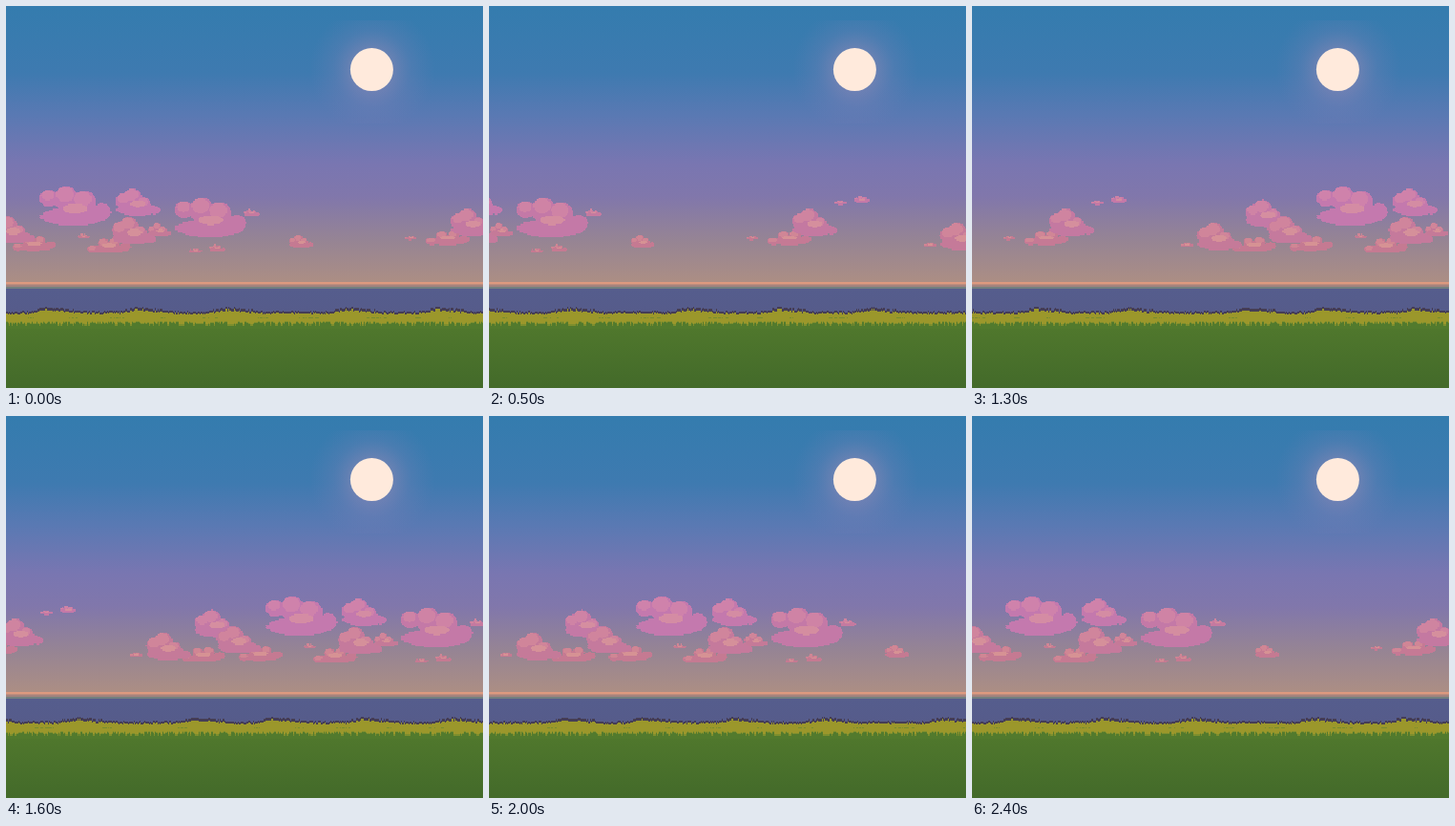
Write an HTML page with a canvas that moves like this. It is 500 by 400 pixels and loops after 2500 ms.

```html
<!DOCTYPE html>
<html lang="en">
<head>
<meta charset="utf-8">
<title>Evening meadow</title>
<style>
  html, body { margin: 0; width: 100%; height: 100%; overflow: hidden; background: #46702d; }
  canvas { display: block; width: 100vw; height: 100vh; image-rendering: pixelated; }
</style>
</head>
<body>
<canvas id="stage" width="500" height="400"></canvas>
<script>
const W = 500, H = 400;
const COLS = 576, ROWS = 324;      // art grid of the scrolling strip
const S = H / ROWS;                // stage pixels per art pixel
const LEFT = -1.83;                // stage x of column 0
const STEP = 24, FRAME = 100, FRAMES = 25;

const rgb = c => `rgb(${c.map(Math.round)})`;
const mix = (a, b, t) => a.map((v, i) => v + (b[i] - v) * t);

let seed = 7;
function random() {
  seed = (seed * 16807) % 2147483647;
  return seed / 2147483647;
}

function makeLayer(w, h) {
  const c = document.createElement('canvas');
  c.width = w;
  c.height = h;
  return c.getContext('2d');
}

// Hard-edged ellipse in stage units on the art grid, wrapping at the sides
function blob(g, x, y, rx, ry, color, bottom, rough = 0) {
  const cx = (x - LEFT) / S, cy = y / S, a = rx / S, b = ry / S;
  const end = Math.min(cy + b, bottom / S);
  g.fillStyle = color;
  for (let row = Math.floor(cy - b); row < end; row++) {
    const k = 1 - ((row + 0.5 - cy) / b) ** 2;
    if (k <= 0) continue;
    const half = a * Math.sqrt(k);
    const x0 = Math.round(cx - half - rough * random());
    const x1 = Math.round(cx + half + rough * random());
    for (const turn of [-COLS, 0, COLS]) g.fillRect(x0 + turn, row, x1 - x0, 1);
  }
}

// Sizes of cloud: peak is where the crown sits, left is how fast it falls there
const KINDS = [
  { w: 13, h: 5, peak: 0.5, left: 1, at: [[75, 238], [192, 253], [418, 240], [510, 203], [604, 247]] },
  { w: 17, h: 8, peak: 0.45, left: 1, at: [[249, 212], [213, 249], [531, 198]] },
  { w: 25, h: 14, peak: 0.4, left: 1, at: [[149, 227], [297, 239]] },
  { w: 46, h: 18, peak: 0.5, left: 1.6, at: [[85, 240], [440, 232], [658, 239], [718, 238]] },
  { w: 47, h: 30, peak: 0.32, left: 1.2,
    at: [[115, 189], [111, 219], [466, 210], [621, 225], [672, 201], [695, 218]] },
  { w: 75, h: 42, peak: 0.5, left: 0.35, at: [[35, 187], [177, 199]] }
];

// Body, light and highlight for the highest and the lowest clouds
const HIGH = [[196, 121, 174], [207, 130, 171], [212, 140, 164]];
const LOW = [[197, 122, 146], [208, 134, 148], [214, 146, 148]];

function drawCloud(g, { w, h, peak, left }, x, y) {
  const t = Math.min(1, (y - 187) / 50);
  const [body, light, high] = HIGH.map((c, i) => rgb(mix(c, LOW[i], t)));
  const bottom = y + h;
  const puffs = [0.125, 0.375, 0.625, 0.875].map(u => {
    const d = Math.abs(u - peak), r = h * (0.36 - 0.4 * d);
    const rx = Math.max(r, w * 0.13);
    const drop = d * (u < peak ? left : 1.25);
    return { x: x + Math.min(Math.max(u * w, rx), w - rx), y: y + r + drop * h, rx, r };
  });
  for (const p of puffs) blob(g, p.x, p.y, p.rx, p.r, body, bottom);
  blob(g, x + w * 0.48, y + h * 0.8, w * 0.44, h * 0.22, body, bottom, w / 25);
  for (const p of puffs.slice(0, 3))
    blob(g, p.x - p.rx * 0.1, p.y - p.r * 0.35, p.rx * 0.7, p.r * 0.6, light, bottom);
  blob(g, x + w * 0.5, y + h * 0.6, w * 0.17, h * 0.12, high, bottom);
}

function drawGrass(g) {
  const mounds = Array.from({ length: 7 }, (_, k) =>
    (42 + 95 * k + 30 * Math.floor(k / 3) - LEFT) / S);
  const dot = (x, y, h, color) => {
    g.fillStyle = color;
    g.fillRect(x, y, 1, h);
  };
  for (let x = 0; x < COLS; x++) {
    let rise = 0;
    for (const m of mounds) {
      const d = (x - m + COLS * 1.5) % COLS - COLS / 2;
      rise = Math.max(rise, 3.2 + d * (d < 0 ? 0.2 : -0.1));
    }
    const top = 260 - Math.round(rise + 2 * random());
    const tip = 267 + Math.floor(random() * 4);
    dot(x, top, 2, '#453d55');
    dot(x, top + 2, tip - top - 2, '#9b972b');
    dot(x, tip, 1, '#7e8e2d');
    dot(x, tip + 1, 273 - tip, '#527a2d');
  }
  for (let x = 20; x < COLS - 30; x += 25 + 40 * random())
    for (let i = 3 + 16 * random(); i > 0; i--)
      if (random() < 0.6) dot(Math.floor(x + i), 264, 1, '#768c30');
}

function gradient(g, stops) {
  const y0 = stops[0][0], y1 = stops[stops.length - 1][0];
  const fill = g.createLinearGradient(0, y0, 0, y1);
  for (const [y, ...c] of stops) fill.addColorStop((y - y0) / (y1 - y0), rgb(c));
  g.fillStyle = fill;
  g.fillRect(0, y0, W, y1 - y0);
}

function makeBackdrop() {
  const g = makeLayer(W, H);
  gradient(g, [[0, 52, 124, 174], [70, 62, 122, 176], [115, 90, 121, 179],
    [165, 121, 118, 177], [200, 129, 119, 171], [245, 150, 132, 148], [289, 172, 142, 132]]);

  const glow = g.createRadialGradient(384, 66, 20, 384, 66, 66);
  glow.addColorStop(0, 'rgba(165,140,184,.45)');
  glow.addColorStop(0.45, 'rgba(140,130,184,.2)');
  glow.addColorStop(1, 'rgba(120,125,182,0)');
  g.fillStyle = glow;
  g.fillRect(320, 15, 130, 108);

  g.fillStyle = '#ffeadc';
  g.arc(383.4, 66.6, 22.5, 0, 2 * Math.PI);
  g.fill();

  ['#dc997f', '#a4837e', '#73807f'].forEach((color, i) => {
    g.fillStyle = color;
    g.fillRect(0, 289 + i * 2.5, W, 3);
  });
  gradient(g, [[296, 85, 93, 141], [325, 86, 91, 138]]);
  gradient(g, [[325, 82, 122, 45], [400, 67, 106, 42]]);
  return g.canvas;
}

function makeStrip() {
  const g = makeLayer(COLS, ROWS);
  for (const kind of KINDS)
    for (const [x, y] of kind.at) drawCloud(g, kind, x, y);
  drawGrass(g);
  return g.canvas;
}

const stage = document.getElementById('stage').getContext('2d');
stage.imageSmoothingEnabled = false;
const backdrop = makeBackdrop(), strip = makeStrip();

function draw(now) {
  const frame = Math.floor(now / FRAME) % FRAMES;
  const shift = frame * STEP % COLS;
  stage.drawImage(backdrop, 0, 0);
  for (const turn of [0, COLS])
    stage.drawImage(strip, LEFT + (turn - shift) * S, 0, COLS * S, H);
  requestAnimationFrame(draw);
}
draw(performance.now());
</script>
</body>
</html>
```
